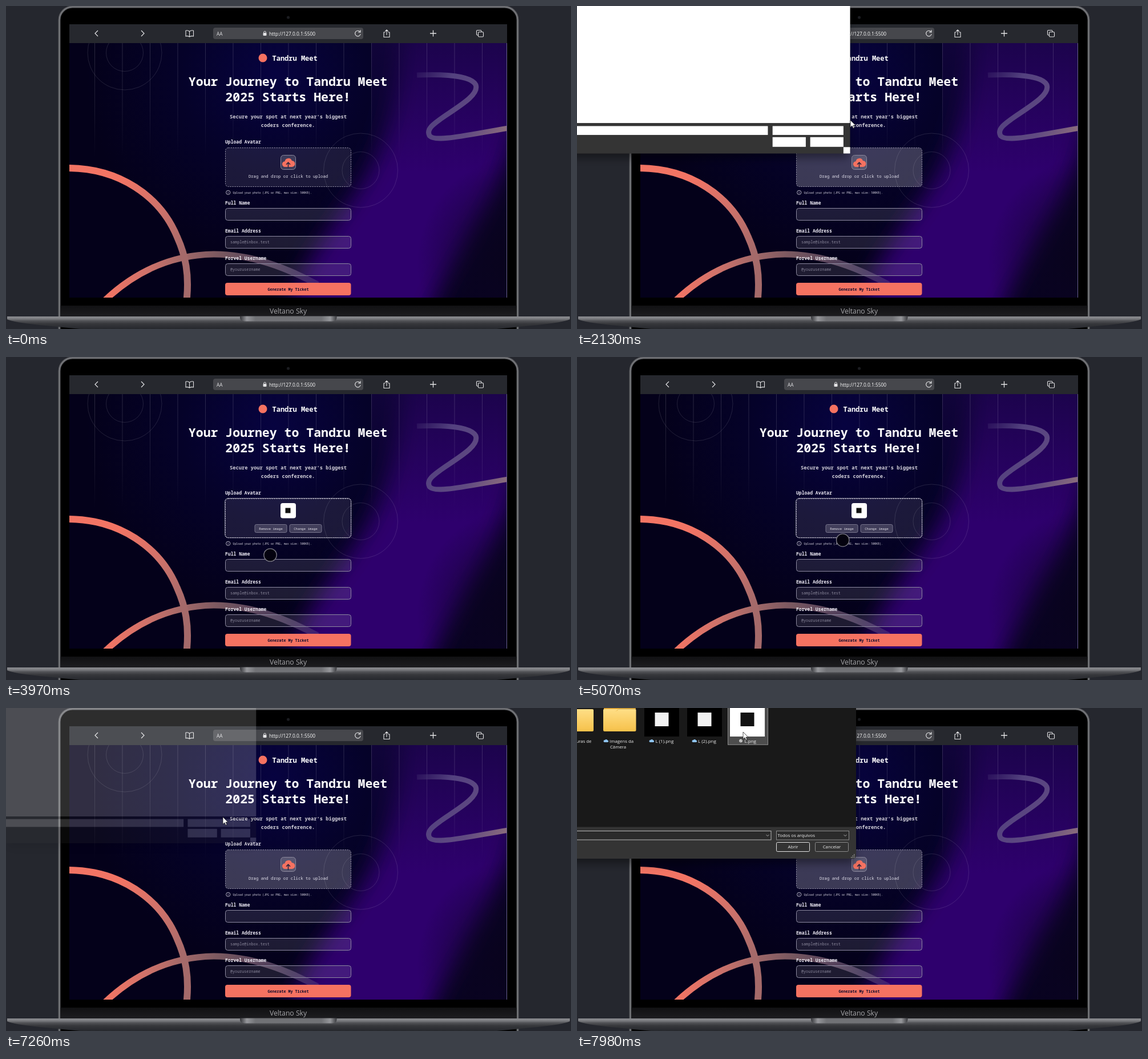
Write an HTML page that moves like this. It is 990 by 566 pixels and loops after 8 s.

```html
<!DOCTYPE html>
<html lang="en">
<head>
<meta charset="utf-8">
<title>Ticket form</title>
<style>
  html, body { margin: 0; width: 100%; height: 100%; overflow: hidden; background: #25272e; }
  svg { display: block; width: 990px; height: 566px; }
  .mono { font-family: "Noto Sans Mono", "DejaVu Sans Mono", monospace; white-space: pre; }
  .ui { font-family: "Open Sans", "Noto Sans", sans-serif; }
</style>
</head>
<body>
<svg id="stage" viewBox="0 0 990 566" xmlns="http://www.w3.org/2000/svg"></svg>
<script>
const LOOP = 8000;
const CORAL = '#f57261';

// ---------- drawing helpers ----------
const rect = (x, y, w, h, r, rest) => `<rect x="${x}" y="${y}" width="${w}" height="${h}" rx="${r}" ${rest}/>`;
const circle = (x, y, r, rest) => `<circle cx="${x}" cy="${y}" r="${r}" ${rest}/>`;
const line = (d, color, w = 1.2) => `<path d="${d}" fill="none" stroke="${color}" stroke-width="${w}"/>`;
const text = (x, y, size, str, fill = '#fff', weight = 400, anchor = 'start', cls = 'mono') =>
  `<text class="${cls}" x="${x}" y="${y}" font-size="${size}" fill="${fill}" font-weight="${weight}" text-anchor="${anchor}">${str}</text>`;
const ui = (x, y, size, str, fill = '#eee', anchor = 'start') => text(x, y, size, str, fill, 400, anchor, 'ui');
const stops = list => list.map(([o, c, a = 1]) => `<stop offset="${o}" stop-color="${c}" stop-opacity="${a}"/>`).join('');
const linear = (id, x1, y1, x2, y2, list) =>
  `<linearGradient id="${id}" gradientUnits="userSpaceOnUse" x1="${x1}" y1="${y1}" x2="${x2}" y2="${y2}">${stops(list)}</linearGradient>`;
const radial = (id, x, y, r, list) =>
  `<radialGradient id="${id}" gradientUnits="userSpaceOnUse" cx="${x}" cy="${y}" r="${r}">${stops(list)}</radialGradient>`;

const defs = `<defs>
  ${linear('base', 0, 543, 0, 566, [[0, '#8f9094'], [.22, '#7c7d81'], [.38, '#515256'], [.6, '#36373b'], [1, '#26282d']])}
  ${linear('notch', 410, 0, 580, 0, [[0, '#35363a'], [.07, '#96979b'], [.16, '#717276'], [.84, '#717276'], [.93, '#96979b'], [1, '#35363a']])}
  ${linear('chin', 0, 525, 0, 545, [[0, '#111113'], [1, '#1d1d20']])}
  ${radial('navy', 470, 120, 330, [[0, '#070340'], [.5, '#050229'], [1, '#050229', 0]])}
  ${radial('shade', 910, 450, 190, [[0, '#08031a', .9], [.4, '#0b0422', .7], [1, '#12052f', 0]])}
  ${linear('topshade', 0, 65, 0, 290, [[0, '#150540', .72], [1, '#150540', 0]])}
  ${linear('rays', 0, 65, 0, 265, [[0, '#fff', .17], [.6, '#fff', .1], [1, '#fff', 0]])}
  ${linear('arc', 200, 300, 310, 430, [[0, '#f27464'], [.5, '#cf726a'], [1, '#a56a6a']])}
  ${linear('swoop', 180, 0, 548, 0, [[0, '#f07464'], [.18, '#cf726a'], [.36, '#a06868'], [.55, '#75565f'], [.8, '#5d4a69', .8], [1, '#5b4580', .45]])}
  ${linear('ribbon', 716, 120, 878, 216, [[0, '#463672', .25], [.3, '#53417f'], [.7, '#614b82'], [1, '#8a6c7c']])}
  ${linear('folder', 0, 0, 0, 41, [[0, '#ffe08a'], [1, '#f6c14a']])}
  <filter id="blur" x="-30%" y="-30%" width="160%" height="160%"><feGaussianBlur stdDeviation="19"/></filter>
  <filter id="drop" x="-20%" y="-20%" width="140%" height="150%"><feGaussianBlur stdDeviation="8"/></filter>
  <clipPath id="page">${rect(111, 65, 767, 446, 0, '')}</clipPath>
</defs>`;

// ---------- laptop and browser bar ----------
const laptop = () =>
  rect(0, 0, 990, 566, 0, 'fill="#25272e"') +
  rect(93.5, 1.5, 803, 590, 23, 'fill="#000" stroke="#55565a" stroke-width="4"') +
  rect(93.5, 1.5, 803, 590, 23, 'fill="none" stroke="#7c7d81" stroke-width="1.6"') +
  rect(95.5, 525, 799, 20, 0, 'fill="url(#chin)"') +
  circle(494.5, 20, 2.6, 'fill="#1b1c20"') +
  text(494.5, 539.3, 12.2, 'Veltano Sky', '#a6a6a9', 400, 'middle', 'ui') +
  '<path d="M2 544H988V549C970 557 915 560 860 566H130C75 560 20 557 2 549Z" fill="url(#base)"/>' +
  '<path d="M410 543.5H579.5V546Q579.5 552.5 571 552.5H419Q410 552.5 410 546Z" fill="url(#notch)"/>';

const bar = () => {
  const c = '#e3e3e5';
  return rect(111, 32, 767, 33, 0, 'fill="#26282e"') +
    rect(363, 38, 263, 20, 4, 'fill="#46474c"') +
    line('M161 43l-5 5 5 5M237 43l5 5-5 5', c) +
    line('M321.5 44.5Q318 42 315 43.2V53Q318 52 321.5 54Q325 52 328.5 53V43.2Q325 42 321.5 44.5V54', c, 1.1) +
    ui(369, 51.7, 8.2, 'AA', c) +
    rect(450.5, 47, 6, 5, 1, `fill="${c}"`) + line('M451.7 47.5V46a1.8 1.8 0 0 1 3.6 0V47.5', c, 1) +
    ui(461, 51.5, 8.35, 'http://127.0.0.1:5500', '#fff') +
    line('M620.5 45.5A4.8 4.8 0 1 0 621.2 49M621 42V46H617', c, 1.1) +
    line('M664.5 46H662V54.5H672V46H669.5M667 51V42M664.3 44.5L667 41.8L669.7 44.5', c, 1.1) +
    line('M748.5 42.5V53.5M743 48H754', c, 1.3) +
    rect(824.5, 42.5, 8.5, 8.5, 1.5, `fill="none" stroke="${c}" stroke-width="1.1"`) +
    rect(827.5, 45.5, 9, 8.5, 1.5, `fill="#26282e" stroke="${c}" stroke-width="1.1"`);
};

// ---------- page ----------
const backdrop = () => {
  const faint = 'fill="none" stroke="#fff" stroke-opacity=".12"';
  let s = rect(111, 65, 767, 446, 0, 'fill="#04011a"') +
    rect(111, 65, 767, 446, 0, 'fill="url(#navy)"') +
    '<path d="M694 20C690 160 668 230 632 296C596 362 530 420 482 560H735C780 440 872 350 900 190V20Z" fill="#2e016d" filter="url(#blur)"/>' +
    rect(600, 65, 278, 446, 0, 'fill="url(#shade)"') +
    rect(640, 65, 238, 230, 0, 'fill="url(#topshade)"');
  for (let i = 0; i < 15; i++) s += rect(155 + i * 48.5, 65, .9, 200, 0, 'fill="url(#rays)"');
  for (const [x, y] of [[208, 82], [621.5, 288]])
    for (const r of [65, 32.5]) s += circle(x, y, r, faint);
  return s +
    line('M720 121C768 119 815 122 823 138C829 154 800 172 770 192C748 207 736 216 742 227C750 240 812 225 880 214', 'url(#ribbon)', 9) +
    line('M172 517C225 466 290 436 364 435C430 435 490 458 546 488', 'url(#swoop)', 11) +
    line('M108 284C197 284 270 332 300 405C314 436 322 470 316 520', 'url(#arc)', 12) +
    rect(877, 65, 1, 446, 0, 'fill="#6a6190"');
};

const EDGE = '#8d8aa0';
const field = (y, label, hint, id) =>
  text(384, y - 6.4, 8.05, label, '#eceaf2', 600) +
  rect(384.5, y + .5, 220, 21, 4, `fill="#fff" fill-opacity=".1" stroke="${EDGE}"${id ? ` id="${id}"` : ''}`) +
  text(393, y + 13.2, 6.75, hint, '#8b889c');
const chip = (x, label) =>
  rect(x + .5, 293.5, 56, 14, 2.5, 'fill="#fff" fill-opacity=".16" stroke="#77748c"') +
  text(x + 28.5, 302.6, 5.75, label, '#e4e2ea', 400, 'middle');

const form = () =>
  circle(450, 91, 7.5, `fill="${CORAL}"`) +
  text(466.5, 95.6, 12, 'Tandru Meet', '#fff', 600) +
  text(494, 140, 21.5, 'Your Journey to Tandru Meet', '#fff', 700, 'middle') +
  text(494, 167, 21.5, '2025 Starts Here!', '#fff', 700, 'middle') +
  text(494.5, 196.5, 8.77, "Secure your spot at next year's biggest", '#d3d1da', 600, 'middle') +
  text(494, 212, 8.77, 'coders conference.', '#d3d1da', 600, 'middle') +
  text(384, 241, 8.05, 'Upload Avatar', '#eceaf2', 600) +
  rect(384.5, 248.5, 220, 68, 5, `id="drop-box" fill="#fff" stroke="${EDGE}" stroke-dasharray="2.5 1.5"`) +
  rect(383.7, 247.6, 221, 69.2, 5.5, 'id="focus" fill="none" stroke="#c6c5d0" stroke-dasharray="2.5 .6"') +
  '<g id="empty">' +
    rect(481.5, 261.5, 26, 25, 5, 'fill="#fff" fill-opacity=".15" stroke="#8a879c"') +
    `<path d="M489 282a4.9 4.9 0 0 1-.5-9.800a6.400 6.400 0 0 1 12.300-1.200a5.500 5.500 0 0 1 .2 11z" fill="${CORAL}"/>` +
    line('M494.5 284V274.5M491 277.7L494.5 274.2L498 277.7', '#2a2540', 1.6) +
    text(494.5, 300.5, 7.25, 'Drag and drop or click to upload', '#e0deea', 400, 'middle') +
  '</g><g id="filled">' +
    rect(481, 256, 27, 26.5, 4, 'fill="#fff"') + rect(489.5, 264.5, 9, 9, 0, 'fill="#111"') +
    chip(435.5, 'Remove image') + chip(496.5, 'Change image') +
  '</g>' +
  circle(389.2, 326.8, 3.6, 'fill="none" stroke="#c9c7d4" stroke-width=".9"') +
  line('M389.2 326.3V328.6M389.2 324.8V325.5', '#c9c7d4', .8) +
  text(397.5, 328.6, 4.8, 'Upload your photo (JPG or PNG, max size: 500KB).', '#d6d4de') +
  field(354, 'Full Name', '', 'name-field') +
  field(403, 'Email Address', 'sample@inbox.test') +
  field(451, 'Forvel Username', '@yourusername') +
  rect(384, 485, 220.5, 22, 4, `fill="${CORAL}"`) +
  text(494.5, 498.5, 6.7, 'Generate My Ticket', '#0d0a2c', 700, 'middle');

// ---------- file dialog ----------
const cloud = (x, y) => `<path d="M${x} ${y}h5.5a1.7 1.7 0 0 0 0-3.4a2.6 2.6 0 0 0-4.6-.4a1.9 1.9 0 0 0-.9 3.8z" fill="#8fc4ef"/>`;
const thumb = (x, bg, mark) => rect(x, -4, 61, 54, 0, `fill="${bg}"`) + rect(x + 18.5, 8, 24, 24, 0, `fill="${mark}"`);
const box = (x, y, w, h, r, c, fill = '#2b2b2b') => rect(x, y, w, h, r, `fill="${fill}" stroke="${c}"`);
const caret = x => line(`M${x - 2.5} 222l2.5 2.5l2.5-2.5`, '#bbb', .9);

const dialog = () =>
  rect(-20, 6, 506, 266, 4, 'fill="#000" fill-opacity=".42" filter="url(#drop)"') +
  '<path d="M-40-40H489V258Q489 264 483 264H-40Z" fill="#343434"/>' +
  '<g id="blank">' +
    rect(-40, -40, 529, 249, 0, 'fill="#fff"') +
    [[-40, 214.5, 380.5, 16], [349, 214.5, 128, 16], [349, 234.5, 60, 17.5], [417, 234.5, 60, 17.5], [477, 252.5, 12, 11.5]]
      .map(([x, y, w, h]) => rect(x, y, w, h, 0, 'fill="#fff"')).join('') +
  '</g><g id="files">' +
    rect(-40, -40, 529, 248.5, 0, 'fill="#191919"') +
    rect(-30, 2, 59, 39, 2, 'fill="url(#folder)"') +
    rect(47, -3, 25, 12, 2, 'fill="#d1921f"') + rect(46, 1.5, 57.5, 39.5, 2.5, 'fill="url(#folder)"') +
    '<path d="M48 6H68L73 1.5H103V-3H72V3Q70 6 66 6Z" fill="#e5ab35"/>' +
    ui(25.5, 61, 7.8, 'Capturas de', '#eee', 'end') +
    cloud(48, 60) + ui(57, 61, 7.8, 'Imagens da') + ui(72, 71, 7.8, 'Câmera', '#eee', 'middle') +
    thumb(118, '#000', '#f2f2f2') + cloud(128, 60) + ui(137.5, 61, 8, 'L (1).png') +
    thumb(193, '#000', '#f2f2f2') + cloud(203, 60) + ui(212, 61, 8, 'L (2).png') +
    rect(264.5, -6, 70, 70.3, 0, 'id="pick" fill="#4d4d4d" stroke="#8c8c8c"') +
    thumb(268, '#fff', '#111') +
    circle(287, 57.5, 2.8, 'fill="#d8d8d8"') + line('M285.7 57.5l1 1l1.8-2', '#444', .8) + ui(293.5, 61, 8, 'L.png') +
    box(-20, 215.5, 360, 15.5, 0, '#b9b9b9') + caret(334) +
    box(349.5, 215.5, 127, 15.5, 0, '#8a8a8a') + ui(351.5, 226.2, 7.8, 'Todos os arquivos') + caret(470) +
    box(349.5, 235.5, 58, 16, 2, '#e4e4e4', '#333') + ui(378.5, 246.3, 7.8, 'Abrir', '#eee', 'middle') +
    box(417.5, 235.5, 58, 16, 2, '#8a8a8a', '#333') + ui(446.5, 246.3, 7.8, 'Cancelar', '#eee', 'middle') +
    [[486, 257], [486, 259.5], [483.5, 259.5], [486, 262], [483.5, 262], [481, 262]]
      .map(([x, y]) => rect(x - 1, y - 1, 1.4, 1.4, 0, 'fill="#aaa"')).join('') +
  '</g>';

const stage = document.getElementById('stage');
stage.innerHTML = defs + laptop() + bar() +
  `<g clip-path="url(#page)">${backdrop()}</g>` + form() +
  circle(0, 0, 11.2, 'id="dot" fill="#04020f" stroke="#7d7b86" stroke-width="1.3"') +
  `<g id="dialog">${dialog()}</g>` +
  '<path id="arrow" d="M0 0V12.5L3 9.8L5 14.3L7 13.4L5 9H9Z" fill="#fff" stroke="#111" stroke-width=".7"/>';

// ---------- motion ----------
const part = {};
for (const id of ['drop-box', 'focus', 'empty', 'filled', 'name-field', 'dot', 'dialog', 'blank', 'files', 'pick', 'arrow'])
  part[id] = document.getElementById(id);

const smooth = k => k * k * (3 - 2 * k);
// Rows are [time, ...values]; values between rows are blended.
function track(rows, t, ease = k => k) {
  if (t <= rows[0][0]) return rows[0].slice(1);
  for (let i = 1; i < rows.length; i++) {
    const a = rows[i - 1], b = rows[i];
    if (t < b[0]) {
      const k = ease((t - a[0]) / (b[0] - a[0]));
      return a.slice(1).map((v, j) => v + (b[j + 1] - v) * k);
    }
  }
  return rows[rows.length - 1].slice(1);
}
const within = (t, ...spans) => spans.some(([a, b]) => t >= a && t < b);

const DOT = [
  [150, 812, 524], [500, 660, 400], [940, 497, 272.5], [1270, 497, 272.5], [1400, 496, 306],
  [3440, 420, 180], [3700, 612, 296], [3970, 463, 347], [4110, 463, 363], [4250, 463, 370],
  [4630, 463, 370], [5000, 466, 325], [5280, 464, 300], [5450, 464, 300], [5850, 478, 362],
  [5960, 480, 362], [6090, 481.5, 341], [6230, 484, 338], [6290, 485, 336], [6600, 495, 285]];
const ARROW = [
  [1600, 496, 300], [2130, 479, 200], [2410, 462, 180], [2950, 318, 36], [3160, 312.5, 26.5],
  [3440, 312.5, 26.5], [6870, 495, 285], [7260, 380, 191], [7650, 302, 50], [7980, 291, 42]];
// Dialog: opacity and scale
const OPEN = [[0, 0, .83], [360, 0, .83], [390, .17, .855], [510, 1, .955], [530, 1, .97], [670, 1, 1]];
const CLOSE = [[3180, 1, 1], [3240, .87, .995], [3440, 0, .93]];

const show = (id, on) => { part[id].style.display = on ? '' : 'none'; };
const place = (id, x, y, s = 1) => part[id].setAttribute('transform', `translate(${x.toFixed(2)} ${y.toFixed(2)}) scale(${s.toFixed(4)})`);

function render(t) {
  const [dx, dy] = track(DOT, t, smooth);
  const dotOn = within(t, [190, 1600], [3440, 6870]);
  show('dot', dotOn);
  place('dot', dx, dy, within(t, [1070, 1270], [5480, 5550], [6590, 6660]) ? .88 : 1);

  const [ax, ay] = track(ARROW, t, smooth);
  show('arrow', within(t, [1600, 3440], [6870, LOOP]));
  place('arrow', ax, ay);

  const opened = t < 5000 ? t - 1600 : t - 6870;
  const [alpha, s] = within(t, [3180, 5000]) ? track(CLOSE, t) : track(OPEN, opened);
  show('dialog', alpha > 0);
  part.dialog.style.opacity = alpha;
  place('dialog', 137 * (1 - s), 77 * (1 - s), s);
  const loaded = within(t, [2410, 3500], [7650, LOOP]);
  show('files', loaded);
  show('blank', !loaded);
  show('pick', ax < 334 && ay < 64);

  const overBox = dotOn && dx > 384 && dx < 605 && dy > 248 && dy < 316;
  const lit = overBox || within(t, [1400, 3440], [6600, LOOP]);
  part['drop-box'].setAttribute('fill-opacity', lit ? .22 : .09);
  const overName = within(t, [4110, 4720], [5800, 6200]);
  part['name-field'].setAttribute('fill-opacity', overName ? .22 : .1);

  show('focus', within(t, [1270, 1600], [3200, 5480], [6600, 6870]));
  const filled = within(t, [3440, 5480]);
  show('filled', filled);
  show('empty', !filled);
}

const start = performance.now();
function tick() {
  render((performance.now() - start) % LOOP);
  requestAnimationFrame(tick);
}
render(0);
requestAnimationFrame(tick);
</script>
</body>
</html>
```
